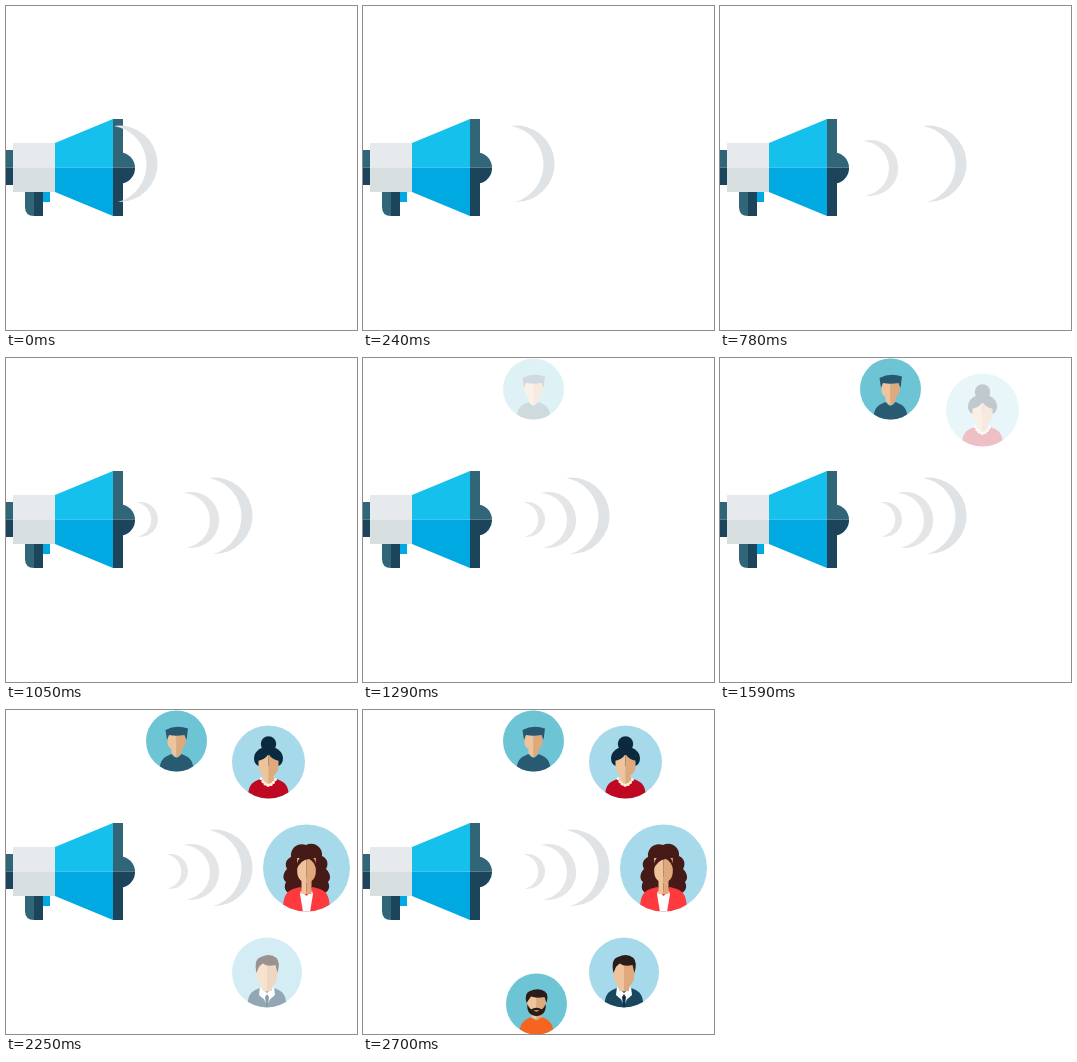
Recreate the animation shown at these times as an HTML page. Size 351x324 px, loop 5070 ms.

```html
<!DOCTYPE html>
<html lang="en">
<head>
<meta charset="utf-8">
<title>Megaphone and audience</title>
<style>
  html, body { margin: 0; width: 100%; height: 100%; overflow: hidden; background: #fff; }
  svg { display: block; }
</style>
</head>
<body>
<svg id="stage" width="351" height="324" viewBox="0 0 351 324"></svg>
<script>
const LOOP = 5070, STEP = 30;
const TEAL = '#6dc4d4', SKY = '#a6d9ea', SLATE = '#316679', NAVY = '#1c455b';
const LIGHT = '#efc39c', SHADE = '#dfa97b', HAIR = '#2a1c18';

const shape = (fill, d) => `<path fill="${fill}" d="${d}"/>`;
const box = (fill, x, y, w, h) => shape(fill, `M${x} ${y}h${w}v${h}h${-w}z`);

// Neck and face, each split into a light and a shaded half
function head(x, half, top, chin, neck, neckEnd) {
  const side = (s, fill) => {
    const jaw = top + (chin - top) * 0.55;
    const edge = x + s * half;
    return box(fill, x, chin - 6, s * neck, neckEnd - chin + 6) +
      shape(fill, `M${x} ${top}H${edge}V${jaw}C${edge} ${chin - 4} ${x + s * 4} ${chin} ${x} ${chin}z`);
  };
  return side(-1, LIGHT) + side(1, SHADE);
}

// Shoulders that rise from the bottom of the badge to a neckline
const torso = (fill, x, half, top, bottom, neck, dip) => shape(fill,
  `M${x - half} ${bottom}C${x - half} ${top + 6} ${x - half + 4} ${top + 3} ${x - neck} ${top}` +
  `Q${x} ${top + dip} ${x + neck} ${top}C${x + half - 4} ${top + 3} ${x + half} ${top + 6} ${x + half} ${bottom}z`);

const megaphone =
  box(SLATE, 0, 144, 7, 17.5) + box(NAVY, 0, 161.5, 7, 17.5) +
  box('#e6eaed', 7, 137, 42, 24.5) + box('#d7dfe1', 7, 161.5, 42, 24.5) +
  shape('#16c0ec', 'M49 137L107 113V161.5H49z') +
  shape('#00a9e2', 'M49 161.5H107V210L49 186z') +
  box(SLATE, 107, 113, 10, 48.5) + box(NAVY, 107, 161.5, 10, 48.5) +
  shape(SLATE, 'M117 146.7A15.5 15.5 0 0 1 129 161.5H117z') +
  shape(NAVY, 'M117 177.3A15.5 15.5 0 0 0 129 161.5H117z') +
  shape(SLATE, 'M19 186h9v24q-9 0 -9 -9z') +
  box(NAVY, 28, 186, 9, 24) + box('#00a9e2', 37, 186, 7, 10);

const waves = [
  { from: 0, to: 570, shift: -95, fill: '#dfe3e6',
    d: 'M203 120A38.2 38.2 0 1 1 207 196A39 39 0 0 0 203 120z' },
  { from: 600, to: 990, shift: -65, fill: '#e4e5e6',
    d: 'M177.5 135A28 28 0 1 1 180.5 189.5A27.4 27.4 0 0 0 177.5 135z' },
  { from: 1020, to: 1230, shift: -35, fill: '#e5e6e7',
    d: 'M160 144.5A17.4 17.4 0 1 1 162 178.5A17.3 17.3 0 0 0 160 144.5z' }
];

const people = [
  { x: 170.5, y: 31, r: 30.5, fill: TEAL, fade: [1230, 0, 1290, .22, 1320, .22, 1530, 1],
    art: torso('#285a72', 170.5, 17, 44, 62, 5, 7) +
      head(170.5, 9, 23, 41, 5, 44) +
      shape(LIGHT, 'M165.5 43h5v4.8z') + shape(SHADE, 'M175.5 43h-5v4.8z') +
      shape('#285770', 'M161 30L159.5 20Q170 14.5 182 18.5L180.5 30L178.5 25Q170 26.5 163 25z') },

  { x: 262.5, y: 52, r: 36.5, fill: SKY, fade: [1530, 0, 1770, 1],
    art: shape('#0b2a40', 'M248 48C249 33 276 33 277 48Q277 54 272.5 56H252.5Q248 54 248 48z') +
      '<circle cx="262.5" cy="34" r="7.7" fill="#0b2a40"/>' +
      head(262.5, 10, 45, 67, 5, 70) +
      shape(LIGHT, 'M262.5 67V77Q256 76 254 69z') + shape(SHADE, 'M262.5 67V77Q269 76 271 69z') +
      torso('#bf0822', 262.5, 20.5, 69, 89, 8, 15) +
      shape('#0b2a40', 'M250.5 51Q251 41 262.5 40Q274 41 274.5 51Q266 50 262.5 44Q259 50 250.5 51z') +
      '<path d="M255 68.5Q262.5 82 270 68.5" fill="none" stroke="#fff1dc" stroke-width="3.2" stroke-linecap="round" stroke-dasharray="0 3.3"/>' },

  { x: 300.5, y: 158, r: 43.5, fill: SKY, fade: [1770, 0, 2025, 1],
    art: shape('#461b17', 'M300 135C309 131 317 138 316 146C323 149 322 156 320 159C325 164 325 169 322 172C326 180 319 185 312 184H290C282 185 276 180 280 172C276 169 277 163 281 159C278 153 281 149 285 147C284 138 292 132 300 135z') +
      torso('#ff3a3f', 300.5, 23.5, 177, 202, 6, 8) +
      shape('#fff', 'M295 181L300.5 186L306 181L307 184L304 202H297L294 184z') +
      head(300.5, 9.3, 148, 173, 5, 184) +
      shape('#461b17', 'M290.5 160Q290 146 300.5 145Q311 146 310.5 160Q308 151 303 149Q294 150 290.5 160z') },

  { x: 261, y: 262.5, r: 35, fill: SKY, fade: [2115, 0, 2400, 1],
    art: torso('#1b4660', 261, 19.5, 278, 298, 7, 7) +
      shape('#fff', 'M254 277L261 283L268 277L269 285L264.5 289L261 285L257.5 289L253 285z') +
      shape('#fff', 'M257.5 288L261 284L264.5 288L261 296z') +
      shape('#123047', 'M261 284L263 287L261.8 297H260.2L259 287z') +
      head(261, 10.2, 252, 278, 5, 281) +
      shape(HAIR, 'M250.5 263Q247.5 249 255 247Q264 242.5 270.5 248Q274.5 252 271.5 263L269.5 255Q261 257 257 253.5Q253 256 252.5 258z') },

  { x: 173.5, y: 294, r: 30.5, fill: TEAL, fade: [2400, 0, 2700, 1],
    art: torso('#f6651f', 173.5, 17, 307, 325, 5, 6) +
      head(173.5, 9.2, 285, 303, 5, 308) +
      shape(LIGHT, 'M168.5 307h5v3.2z') + shape(SHADE, 'M178.5 307h-5v3.2z') +
      shape(HAIR, 'M163.5 293Q161 283 167 281Q175 277.5 182 281.5Q186 285 183.5 293L181.5 287Q173 288.5 168 286.5z') +
      shape(HAIR, 'M164.3 294Q167 300 169 299Q173.5 296.5 178 299Q180 300 182.7 294Q183.5 305.5 173.5 306Q163.5 305.5 164.3 294z') +
      shape(SHADE, 'M170.5 300.3H176.5Q173.5 303 170.5 300.3z') }
];

stage.innerHTML = megaphone +
  waves.map(w => shape(w.fill, w.d).replace('<path', '<path class="wave"')).join('') +
  people.map((p, i) => {
    const circle = `<circle cx="${p.x}" cy="${p.y}" r="${p.r}" fill="${p.fill}"/>`;
    return `<clipPath id="clip${i}">${circle}</clipPath>` +
      `<g class="person">${circle}<g clip-path="url(#clip${i})">${p.art}</g></g>`;
  }).join('');

const waveNodes = stage.querySelectorAll('.wave');
const personNodes = stage.querySelectorAll('.person');
const progress = (t, a, b) => Math.min(1, Math.max(0, (t - a) / (b - a)));

// keys: time, value, time, value, ...
function track(t, keys) {
  let value = keys[1];
  for (let i = 2; i < keys.length; i += 2) {
    value += (keys[i + 1] - keys[i - 1]) * progress(t, keys[i - 2], keys[i]);
  }
  return value;
}

function draw(now) {
  const t = Math.floor((now % LOOP) / STEP) * STEP;
  waves.forEach((w, i) => {
    const x = w.shift * (1 - progress(t, w.from, w.to));
    waveNodes[i].setAttribute('transform', `translate(${x} 0)`);
    waveNodes[i].setAttribute('opacity', t >= w.from ? 1 : 0);
  });
  people.forEach((p, i) => personNodes[i].setAttribute('opacity', track(t, p.fade)));
}

let start;
function tick(now) {
  start ??= now;
  draw(now - start);
  requestAnimationFrame(tick);
}
draw(0);
requestAnimationFrame(tick);
</script>
</body>
</html>
```
